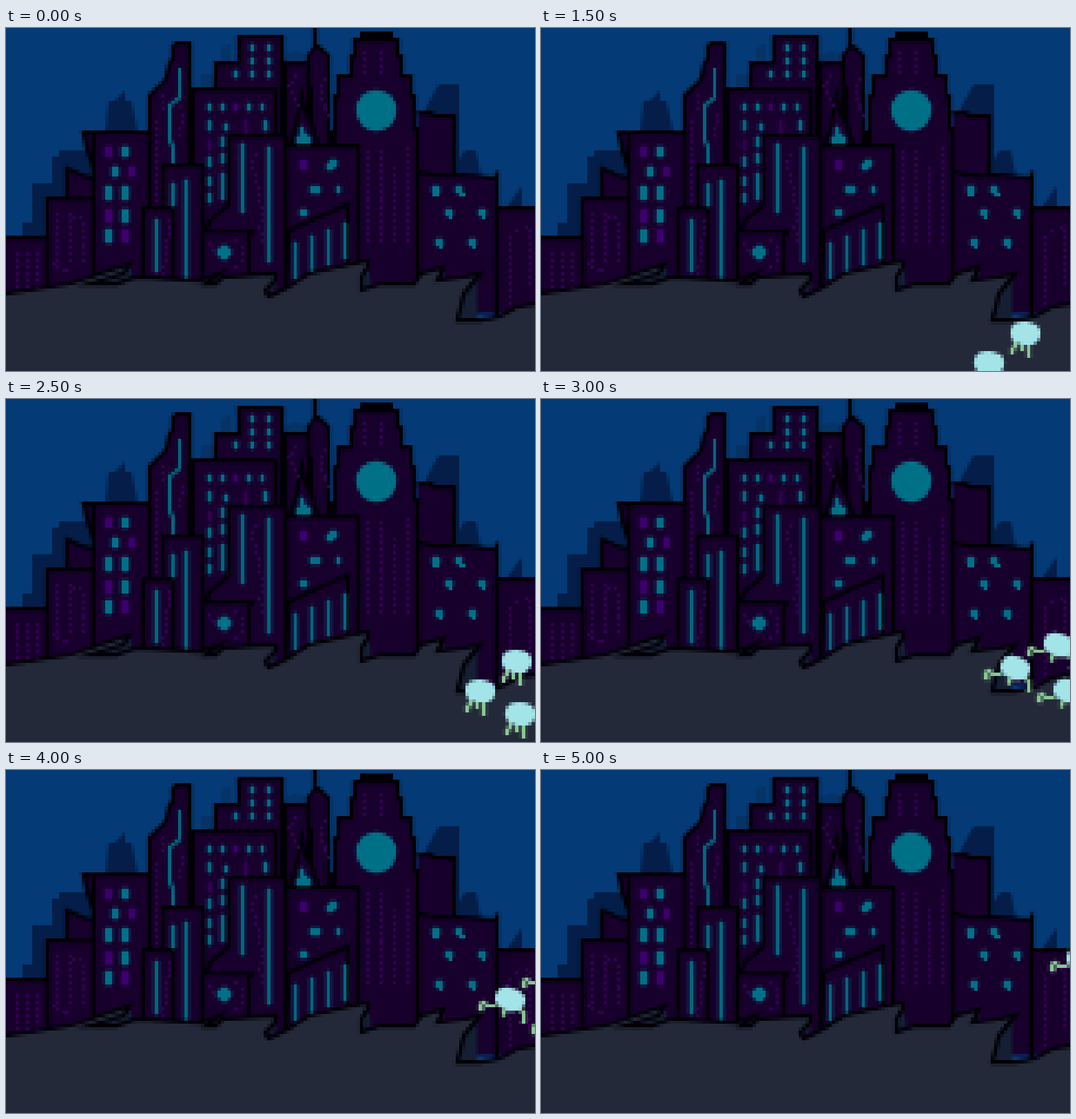
Recreate the animation shown at these times as an HTML page with a canvas. Size 928x603 px, loop 5.5 s.

```html
<!DOCTYPE html>
<html lang="en">
<head>
<meta charset="utf-8">
<title>City at night</title>
<style>
html, body { margin: 0; width: 100%; height: 100%; overflow: hidden; background: #24293a; }
canvas { display: block; width: 928px; height: 603.2px; image-rendering: pixelated; }
</style>
</head>
<body>
<canvas id="stage" width="160" height="104"></canvas>
<script>
// One canvas pixel is one 5.8 px block of the stage.
const W = 160, H = 104, STEP = 500, STEPS = 11;
const stage = document.getElementById('stage').getContext('2d');
const city = document.createElement('canvas');
city.width = W;
city.height = H;
const g = city.getContext('2d');

const SKY = '#043a75', FAR = '#041e49', HAZE = '#053365', WALL = '#18002d', INK = '#000006';
const GROUND = '#24293a', SHADE = '#151e33', TEAL = '#007086', STRIP = '#00687f';
const VIOLET = '#3b006c', DOT = '#30004f', BELL = '#a3e4e8', ARM = '#8bc797';

const points = text => text.split(' ').map(p => p.split(',').map(Number));

function trace(c, text) {
  c.beginPath();
  for (const [x, y] of points(text)) c.lineTo(x, y);
}

function fill(text, color) {
  trace(g, text);
  g.fillStyle = color;
  g.fill();
}

function line(c, text, color, width) {
  trace(c, text);
  c.strokeStyle = color;
  c.lineWidth = width;
  c.stroke();
}

// The outline names the blocks it runs through; the wall reaches down behind the ground.
function building(text) {
  const p = points(text);
  g.save();
  g.translate(.5, .5);
  fill(`${text} ${p.at(-1)[0]},86 ${p[0][0]},86`, WALL);
  line(g, text, INK, 1.25);
  g.restore();
}

function lit(x, y, w, h, color = TEAL) {
  g.fillStyle = color;
  g.globalAlpha = .2;
  g.fillRect(x - 1, y, w + 2, h);
  g.fillRect(x, y - 1, w, h + 2);
  g.globalAlpha = 1;
  g.fillRect(x, y, w, h);
}

// Every second block along a polyline.
function dots(text) {
  const p = points(text);
  g.fillStyle = DOT;
  p.forEach(([x, y], i) => {
    const [u, v] = p[i + 1] || [x, y];
    const n = Math.max(1, Math.round(Math.max(Math.abs(u - x), Math.abs(v - y)) / 2));
    for (let k = 0; k < n; k++)
      g.fillRect(Math.round(x + (u - x) * k / n), Math.round(y + (v - y) * k / n), 1, 1);
  });
}

function drawSky() {
  g.fillStyle = SKY;
  g.fillRect(0, 0, W, H);
  ['65,10 65,6 68,5 68,10', '84,10 84,9 87,7 91,8 91,10', '59,18 59,14 63,14 63,18']
    .forEach(s => fill(s, HAZE));
  ['5,64 5,59 8,59 8,47 14,47 14,39 16,39 16,37 27,37 27,64',
   '30,32 31,22 33,22 36,19 36,22 38,22 40,32',
   '126,26 131,17 137,17 137,40 139,37 142,37 144,46 126,46',
   '151,55 156,48 156,55'].forEach(s => fill(s, FAR));
}

function drawBuildings() {
  // Back to front.
  ['63,18 63,10 70,10 70,2 83,2 83,36',
   '84,36 84,10 91,10 91,36',
   '93,-1 93,5',
   '92,36 92,18 91,17 91,8 93,5 94,5 97,8 97,36',
   '85,36 87,30 89,20 90,25 92,29 94,35',
   '56,64 56,18 81,18 81,33',
   '124,25 128,25 129,26 135,26 135,45',
   '124,80 124,43 129,44 137,44 148,45 148,43 148,88',
   '148,88 148,54 161,54 161,90',
   '99,35 99,20 100,20 100,14 104,14 104,8 105,8 105,3 118,3 118,8 119,8 119,14 122,14 122,20 123,20 123,30 124,30 124,78',
   '84,80 84,35 106,35 106,78',
   '84,80 85,61 103,53 103,74',
   '43,78 43,20 48,15 49,10 50,9 50,5 51,4 55,4 55,41',
   '26,42 24,36 23,31 28,31',
   '18,52 18,42 22,44 26,45',
   '12,80 12,51 27,51',
   '26,78 26,31 43,31 43,78',
   '-1,63 12,63 12,82',
   '47,78 47,41 59,41 59,78',
   '41,78 41,54 50,54 50,78',
   '60,61 61,58 67,53 67,32 84,32 84,80',
   '59,78 59,61 74,61 73,63 73,78'].forEach(building);

  g.fillStyle = INK;
  g.fillRect(107, 1, 10, 3);
  g.fillRect(97, 31, 2, 4);
  g.fillRect(56, 19, 1, 6);
}

function drawLights() {
  // Roof block and the wide block below it.
  for (let r = 0; r < 3; r++)
    for (const x of [74, 79]) lit(x, 5 + 4 * r, 1, 2);
  lit(69, 13, 1, 2);
  for (let i = 0; i < 5; i++) lit(61 + 4 * i, 23, 1, 2, i === 2 ? VIOLET : TEAL);
  lit(72, 28, 1, 4, DOT);
  lit(78, 28, 1, 3);
  lit(66, 29, 1, 2);
  for (let i = 0; i < 5; i++) lit(61, Math.round(28 + 5.6 * i), 1, 3, i === 1 ? DOT : STRIP);
  for (const y of [33, 38, 44]) lit(65, y, 1, y === 44 ? 8 : 3, STRIP);

  // Left block: staggered pairs.
  for (let r = 0; r < 5; r++)
    for (let c = 0; c < 2; c++)
      lit(30 + 5 * c + (r === 1 ? 2 : 0), Math.floor(36 + 6.4 * r), 2, r < 2 ? 3 : 4, r % 3 === c ? VIOLET : TEAL);

  // Right block: rows of cut-off panes.
  [[129, 7], [133, 10], [130, 10]].forEach(([x, gap], r) => {
    for (let c = 0; c < 2; c++) {
      lit(x + gap * c, 48 + r * 8 - r % 2, 2, 2);
      g.fillRect(x + gap * c + 1 - (r ? 0 : 1 - c), 50 + r * 8 - r % 2, 2 - (r > 0), 1);
    }
  });

  lit(89, 40, 2, 3, VIOLET);
  lit(97, 41, 2, 2);
  lit(98, 40, 2, 2);
  lit(92, 48, 3, 2);
  lit(100, 48, 1, 2);
  lit(89, 55, 2, 2);
  for (let i = 0; i < 3; i++) lit(89 - (i > 1), 30 + 2 * i - (i > 1), 1 + i + (i > 1), 2);
  lit(65, 66, 2, 4);
  lit(64, 67, 4, 2);

  // Long strips of light.
  lit(50, 47, 1, 7, STRIP);
  lit(54, 46, 1, 30, STRIP);
  lit(45, 58, 1, 16, STRIP);
  lit(71, 35, 1, 21, STRIP);
  lit(79, 36, 1, 35, STRIP);
  for (let i = 0; i < 4; i++) lit(87 + 5 * i, 65 - 2 * i, 1, 11, STRIP);
  line(g, '52.5,12 52.5,21 49.5,23.5 49.5,34 50.5,36 50.5,41', STRIP, 1.1);

  // Clock face.
  g.fillStyle = TEAL;
  g.beginPath();
  g.arc(112, 25, 6.2, 0, 7);
  g.fill();
}

function drawDots() {
  [37, 37, 42, 36].forEach((y, i) => dots(`${109 + 4 * i},${y} ${109 + 4 * i},64`));
  for (const x of [108, 113]) dots(`${x},7 ${x},13`);
  for (const x of [3, 6, 9]) dots(`${x},68 ${x},78`);
  for (const x of [15, 19, 23]) dots(`${x},${x < 20 ? 56 : 59} ${x},70`);
  ['20,57 22,57', '14,71 15,72 18,73',
   '45,28 45,52', '47,20 47,24', '53,26 52,32', '49,58 48,66 47,74',
   '75,38 74,40 75,46 76,50 77,56 76,60 77,64',
   '61,65 62,67', '69,64 71,66 71,70 69,72',
   '87,14 85,17 88,23', '96,15 95,17 95,21 97,26',
   '154,61 152,63 152,83', '157,60 158,61 158,77'].forEach(dots);
}

function drawGround() {
  const ridge = '-1,80 6,79 19,77 31,73 37,71 35,74 25,77 33,77 39,75 58,76 64,74 60,77 63,77 ' +
    '65,75 81,74 81,76 78,79 79,81 85,78 91,74 109,70 109,72 107,75 107,79 113,77 123,77 ' +
    '125,74 132,72 130,76 138,75 143,74 138,80 136,88 143,88 149,87 154,84 161,83';
  g.save();
  g.translate(.5, .5);
  fill(ridge + ' 161,105 -1,105', GROUND);
  ['37,72 38,75 33,77 26,77', '142,74 142,88 136,88 138,80', '109,71 110,77 107,79 107,75',
   '81,75 81,79 78,80', '132,73 132,75 130,76', '64,74 64,76 61,77'].forEach(s => fill(s, SHADE));
  line(g, ridge, INK, 1.25);
  g.restore();
}

// Poses are measured from the left and top of the bell.
const spread = {
  tilt: .35,
  arms: ['-3.5,6.6 -4.5,6.5 -4.5,5 -3.5,4.5 -2.5,5.5 .5,5.5', '4.5,6.5 2.5,7 2.5,8.8', '6.5,6 8.6,7.6 8.6,10.5 7.8,10.5'],
  others: [[13, -7], [16, 7]]
};
const closed = {
  tilt: .1,
  arms: ['1.5,5 1.5,7.6 .5,8.4 .5,10', '3.5,6 3.5,9', '5.5,7 5.5,11'],
  others: [[11, -9], [12, 7]]
};
const swim = points('0,0 121,108 125,103 131,98 134,89 139,85 139,78 146,73 148,66 153,61 159,54');

function jellyfish({ tilt, arms }, x, y) {
  stage.save();
  stage.translate(x, y);
  for (const arm of arms) line(stage, arm, ARM, 1.2);
  stage.fillStyle = BELL;
  stage.beginPath();
  stage.ellipse(4.5, 3.5, 4.6, 3.5, tilt, 0, 7);
  stage.fill();
  stage.restore();
}

function draw(step) {
  stage.drawImage(city, 0, 0);
  if (!step) return;
  const pose = step % 2 ? closed : spread, [x, y] = swim[step];
  for (const [dx, dy] of [[0, 0], ...pose.others]) jellyfish(pose, x + dx, y + dy);
}

[drawSky, drawBuildings, drawLights, drawDots, drawGround].forEach(paint => paint());
const start = performance.now();
let shown = -1;
function tick() {
  const step = Math.floor((performance.now() - start) / STEP) % STEPS;
  if (step !== shown) draw(shown = step);
  requestAnimationFrame(tick);
}
tick();
</script>
</body>
</html>
```
